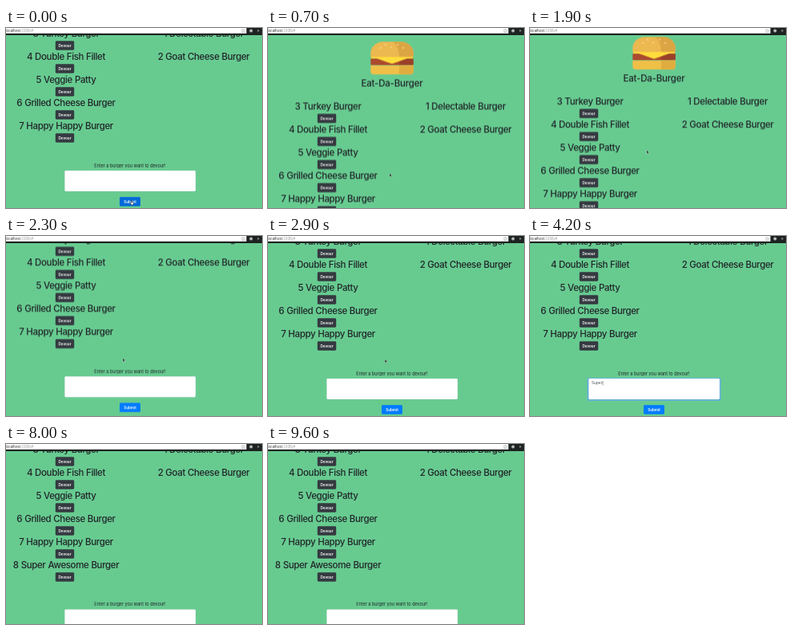
Animation of 320x226 px, one loop 9.7 s. Source, as an HTML page:

```html
<!DOCTYPE html>
<html lang="en">
<head>
<meta charset="utf-8">
<title>Eat-Da-Burger</title>
<style>
  html, body { margin: 0; width: 100%; height: 100%; overflow: hidden; background: #67cb90; }
  svg { display: block; width: 320px; height: 226px; font-family: Inter, Roboto, sans-serif; }
  .head { font-size: 11.5px; font-weight: 500; letter-spacing: -.37px; word-spacing: .3px; fill: #212529; text-anchor: middle; }
  .title { letter-spacing: -.2px; }
  .btn { font-size: 4.6px; font-weight: 600; fill: #fff; text-anchor: middle; }
  .label { font-size: 5.5px; letter-spacing: -.02px; fill: #212529; text-anchor: middle; }
  .input { font-size: 4.8px; fill: #495057; white-space: pre; }
  .url { font-size: 4.5px; letter-spacing: -.1px; fill: #333; }

  #page, #form, #added, #focus, #submit, #mouse, .shape {
    animation: 9.7s linear infinite;
  }
  #page { animation-name: scroll; }
  #form { animation-name: push; animation-timing-function: step-end; }
  #added { animation-name: added; animation-timing-function: step-end; }
  #focus { animation-name: focus; }
  #submit { animation-name: hover; animation-timing-function: step-end; }
  #mouse { animation-name: mouse; }
  .shape { animation-timing-function: step-end; }
  #arrow { animation-name: arrow; }
  #hand { animation-name: hand; }
  #beam { animation-name: beam; }

  @keyframes scroll {
    0%, 3.6% { transform: translateY(-91.5px); animation-timing-function: cubic-bezier(.4, 0, .3, 1); }
    7.2%, 19.07% { transform: translateY(0); animation-timing-function: ease-in; }
    19.59% { transform: translateY(-6px); animation-timing-function: cubic-bezier(.3, .3, .5, 1); }
    23.2%, 23.8% { transform: translateY(-94.2px); animation-timing-function: ease-out; }
    26.5%, 100% { transform: translateY(-91.5px); }
  }
  @keyframes push {
    0% { transform: translateY(0); }
    77.3%, 100% { transform: translateY(28.8px); }
  }
  @keyframes added {
    0% { opacity: 0; }
    77.3%, 100% { opacity: 1; }
  }
  @keyframes focus {
    0%, 32.9% { opacity: 0; }
    34.5%, 76.2% { opacity: 1; }
    77.2%, 100% { opacity: 0; }
  }
  @keyframes hover {
    0% { fill: #0069d9; }
    4.1% { fill: #007bff; }
    72.5% { fill: #0069d9; }
    77.3%, 100% { fill: #007bff; }
  }
  @keyframes mouse {
    0%, 3.6% { transform: translate(157px, 217px); }
    7.2%, 15% { transform: translate(152px, 182.5px); }
    17.5%, 29.4% { transform: translate(146px, 153.5px); animation-timing-function: ease-in-out; }
    33%, 67.5% { transform: translate(150px, 188px); animation-timing-function: ease-in-out; }
    73.5%, 100% { transform: translate(157px, 217px); }
  }
  @keyframes arrow {
    0% { opacity: 0; }
    4.1% { opacity: 1; }
    32% { opacity: 0; }
    71% { opacity: 1; }
    72.5%, 100% { opacity: 0; }
  }
  @keyframes hand {
    0% { opacity: 1; }
    4.1% { opacity: 0; }
    72.5% { opacity: 1; }
    77.3%, 100% { opacity: 0; }
  }
  @keyframes beam {
    0% { opacity: 0; }
    32% { opacity: 1; }
    35.5% { opacity: 0; }
    68% { opacity: 1; }
    71%, 100% { opacity: 0; }
  }
</style>
</head>
<body>
<svg viewBox="0 0 320 226">
  <rect width="320" height="226" fill="#67cb90"/>
  <g id="page">
    <g id="burger">
      <path d="M128.3 36.5V31C128.3 23 136 17 146 17H164C174 17 181.7 23 181.7 31V36.5Z" fill="#ecb850"/>
      <path d="M156 17H164C174 17 181.7 23 181.7 31V36.5H164C164 28 161 21 156 17Z" fill="#dca544"/>
      <g fill="#f8dc9a">
        <ellipse cx="141" cy="25" rx="1.4" ry=".8"/>
        <ellipse cx="147" cy="21" rx="1.4" ry=".8"/>
        <ellipse cx="154" cy="24.5" rx="1.4" ry=".8"/>
        <ellipse cx="162" cy="21" rx="1.4" ry=".8"/>
        <ellipse cx="169" cy="25" rx="1.4" ry=".8"/>
      </g>
      <rect x="128.3" y="38" width="53.4" height="8.6" rx="1.5" fill="#ab4a2e"/>
      <path d="M164 38H180.2Q181.7 38 181.7 39.5V45.1Q181.7 46.6 180.2 46.6H164Z" fill="#9a4129"/>
      <path d="M129 36.3H181V38.2H174L155 45L136 38.2H129Z" fill="#ffdc3c"/>
      <path d="M128.3 47H181.7V54.5Q181.7 58.3 177.5 58.3H132.5Q128.3 58.3 128.3 54.5Z" fill="#f0bf48"/>
      <path d="M164 47H181.7V54.5Q181.7 58.3 177.5 58.3H164Z" fill="#dfad3f"/>
    </g>
    <text class="head title" x="155" y="73">Eat-Da-Burger</text>
    <g id="menu"></g>
    <g id="form">
      <text class="label" x="155" y="266">Enter a burger you want to devour!</text>
      <rect id="focus" x="72.3" y="269.8" width="165.4" height="27.4" rx="2" fill="none" stroke="#5fa8f5" stroke-width="1.3"/>
      <rect x="73.4" y="270.5" width="163.6" height="26" rx="1.4" fill="#fff" stroke="#ced4da" stroke-width=".3"/>
      <text class="input" id="typed" x="77" y="277.8"></text>
      <rect id="caret" y="273.7" width=".5" height="5.2" fill="#333" visibility="hidden"/>
      <rect id="submit" x="142" y="303.7" width="26" height="11.6" rx="1.4"/>
      <text class="btn" x="155" y="311.2">Submit</text>
    </g>
  </g>

  <g id="bar">
    <rect width="320" height="9" fill="#1d2321"/>
    <rect width="300.5" height="6.8" fill="#fff"/>
    <text class="url" x="-.5" y="4.9">localhost<tspan fill="#999">:3308/#</tspan></text>
    <path d="M296.5 1.2l.7 1.5 1.6.2-1.2 1.1.3 1.6-1.4-.8-1.4.8.3-1.6-1.2-1.1 1.6-.2z" fill="none" stroke="#777" stroke-width=".4"/>
    <circle cx="306.3" cy="3.4" r="2" fill="#b4b8b6"/>
    <circle cx="315.3" cy="3.4" r="1.2" fill="#858a88"/>
  </g>

  <g id="mouse">
    <path class="shape" id="arrow" d="M0 0V4.2L1 3.3 1.7 4.8 2.4 4.5 1.7 3.1H3Z" fill="#111" stroke="#fff" stroke-width=".3"/>
    <path class="shape" id="hand" d="M-.5 0Q0-.6.5 0V1.7L2.4 2.2V3.8L1.8 5H-.3L-1.8 2.9-1.2 2.5-.5 3Z" fill="#fff" stroke="#111" stroke-width=".5"/>
    <path class="shape" id="beam" d="M-.8 0H.8M0 0V4.6M-.8 4.6H.8" fill="none" stroke="#333" stroke-width=".4"/>
  </g>
</svg>
<script>
  const LOOP = 9700, ROW = 29, FIRST = 102;
  const $ = id => document.getElementById(id);
  const order = "Super Awesome Burger";
  const waiting = ["3 Turkey Burger", "4 Double Fish Fillet", "5 Veggie Patty",
    "6 Grilled Cheese Burger", "7 Happy Happy Burger", "8 " + order];
  const eaten = ["1 Delectable Burger", "2 Goat Cheese Burger"];

  const heading = (name, x, i) =>
    `<text class="head" x="${x}" y="${FIRST + ROW * i}">${name}</text>`;

  const item = (name, i, all) => {
    const y = FIRST + ROW * i;
    return `<g${i === all.length - 1 ? ' id="added"' : ""}>${heading(name, 75, i)}
      <rect x="61.8" y="${y + 5.8}" width="23.4" height="11.4" rx="1.4" fill="#343a40"/>
      <text class="btn" x="73.5" y="${y + 13.2}">Devour</text></g>`;
  };

  $("menu").innerHTML = waiting.map(item).join("") +
    eaten.map((name, i) => heading(name, 247, i)).join("");

  const typed = $("typed"), caret = $("caret");
  let shown = -1;

  function draw(now) {
    const t = now % LOOP;
    const active = t >= 3300 && t < 7480;
    const count = active ? Math.max(0, Math.min(order.length, Math.floor((t - 3460) / 140))) : 0;
    if (count !== shown) {
      typed.textContent = order.slice(0, count);
      shown = count;
      caret.setAttribute("x", 77.3 + (count ? typed.getComputedTextLength() : 0));
    }
    const typing = t > 3460 && t < 6560;
    const lit = typing || Math.floor((t - 6560) / 500) % 2 !== 0;
    caret.setAttribute("visibility", active && lit ? "visible" : "hidden");
    requestAnimationFrame(() => draw(performance.now()));
  }
  draw(performance.now());
</script>
</body>
</html>
```
